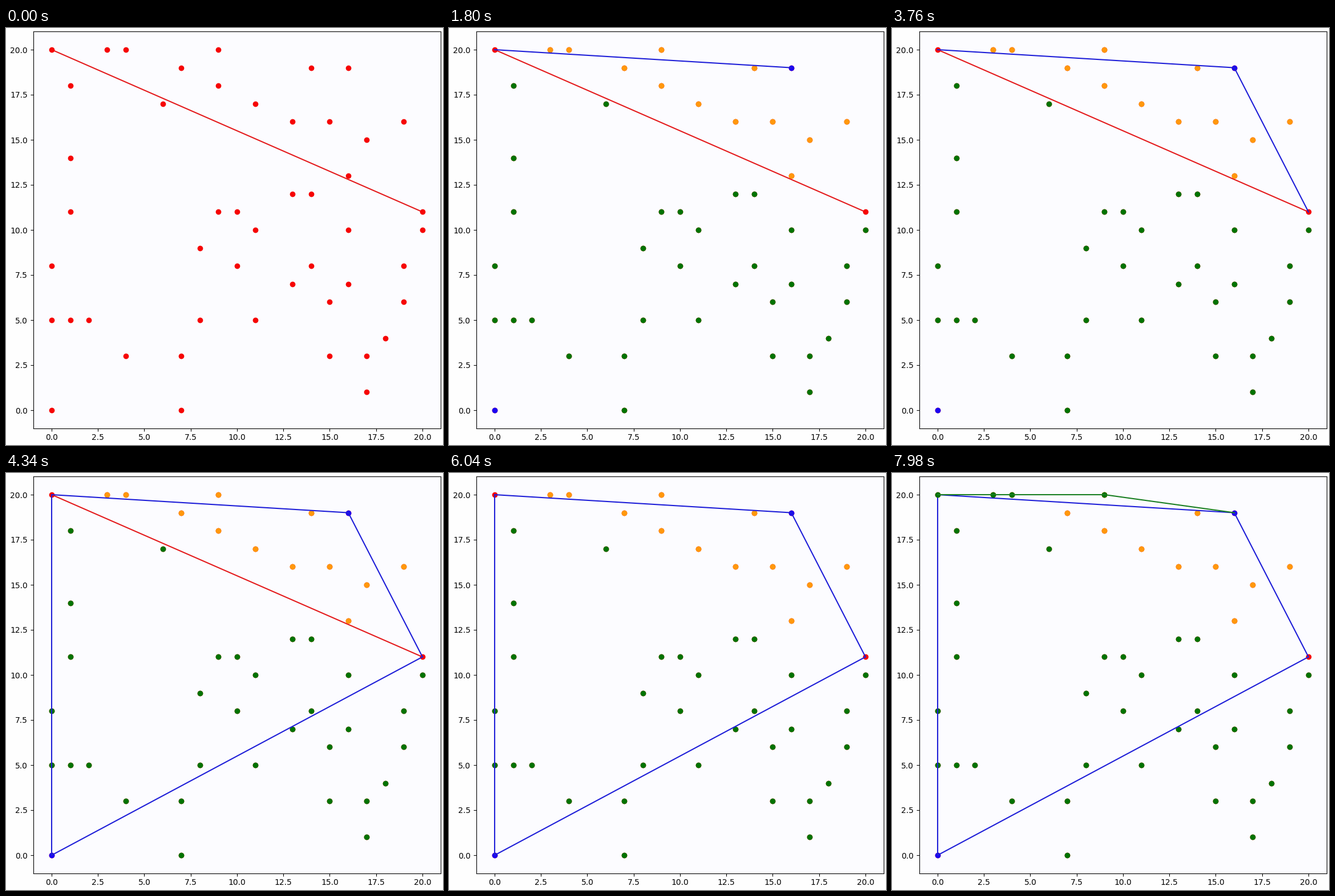
Animation of 766 by 731 pixels, one loop 8 s. Source, as a matplotlib script:

```python
import matplotlib.pyplot as plt
from matplotlib.animation import FuncAnimation

W, H, DPI = 766, 731, 100
STEP = 100            # ms per frame
LOOP = 8000

RED, GREEN, BLUE, ORANGE = "#f60404", "#007300", "#1b00f2", "#ff980c"
RED_LINE, GREEN_LINE, BLUE_LINE = "#e41a1c", "#1a7f22", "#1e1ed8"

# x positions of the points, grouped by y
ROWS = {
    20: (0, 3, 4, 9), 19: (7, 14, 16), 18: (1, 9), 17: (6, 11),
    16: (13, 15, 19), 15: (17,), 14: (1,), 13: (16,), 12: (13, 14),
    11: (1, 9, 10, 20), 10: (11, 16, 20), 9: (8,), 8: (0, 10, 14, 19),
    7: (13, 16), 6: (15, 19), 5: (0, 1, 2, 8, 11), 4: (18,),
    3: (4, 7, 15, 17), 1: (17,), 0: (0, 7),
}
POINTS = [(x, y) for y, xs in ROWS.items() for x in xs]

LEFT, RIGHT, TOP, LOW = (0, 20), (20, 11), (16, 19), (0, 0)
CREST = [LEFT, (3, 20), (4, 20), (9, 20)]

# start times of the stages in ms
SPLIT, UPPER, LOWER, DROP, REFINE = 1200, 2700, 4200, 5700, 7200


def side(p):
    """Positive above the line LEFT-RIGHT, negative below it."""
    (x0, y0), (x1, y1) = LEFT, RIGHT
    return (x1 - x0) * (p[1] - y0) - (y1 - y0) * (p[0] - x0)


fig = plt.figure(figsize=(W / DPI, H / DPI), dpi=DPI, facecolor="#fefefe")
ax = fig.add_axes([47.5 / W, 29.4 / H, 715 / W, 695.2 / H], facecolor="#fcfcff")
ax.set(xlim=(-1, 21), ylim=(-1, 21))
ticks = [2.5 * k for k in range(9)]
ax.set_xticks(ticks)
ax.set_yticks(ticks)
plt.setp(ax.get_xticklabels() + ax.get_yticklabels(),
         family="DejaVu Sans", size=10)

parts = []            # (artist, start, end)


def add(pts, style, color, start=0, end=LOOP):
    artist, = ax.plot(*zip(*pts), style, color=color, lw=1.5, ms=6,
                      zorder=2 + 0.01 * len(parts))
    parts.append((artist, start, end))


add([LEFT, RIGHT], "-", RED_LINE, 0, DROP)
add(POINTS, "o", RED)
add([p for p in POINTS if side(p) > 0 and p != TOP], "o", ORANGE, SPLIT)
add([p for p in POINTS if side(p) < 0 and p != LOW], "o", GREEN, SPLIT)
add([TOP, LOW], "o", BLUE, SPLIT)
add([LEFT, TOP], "-", BLUE_LINE, SPLIT)
add([TOP, RIGHT], "-", BLUE_LINE, UPPER)
add([LEFT, LOW, RIGHT], "-", BLUE_LINE, LOWER)
add(CREST, "o", GREEN, REFINE)
add(CREST + [TOP], "-", GREEN_LINE, REFINE)


def draw(i):
    t = i * STEP
    for artist, start, end in parts:
        artist.set_visible(start <= t < end)
    return [p[0] for p in parts]


anim = FuncAnimation(fig, draw, frames=LOOP // STEP, interval=STEP,
                     init_func=lambda: draw(0), repeat=True, repeat_delay=0)
plt.show()
```
